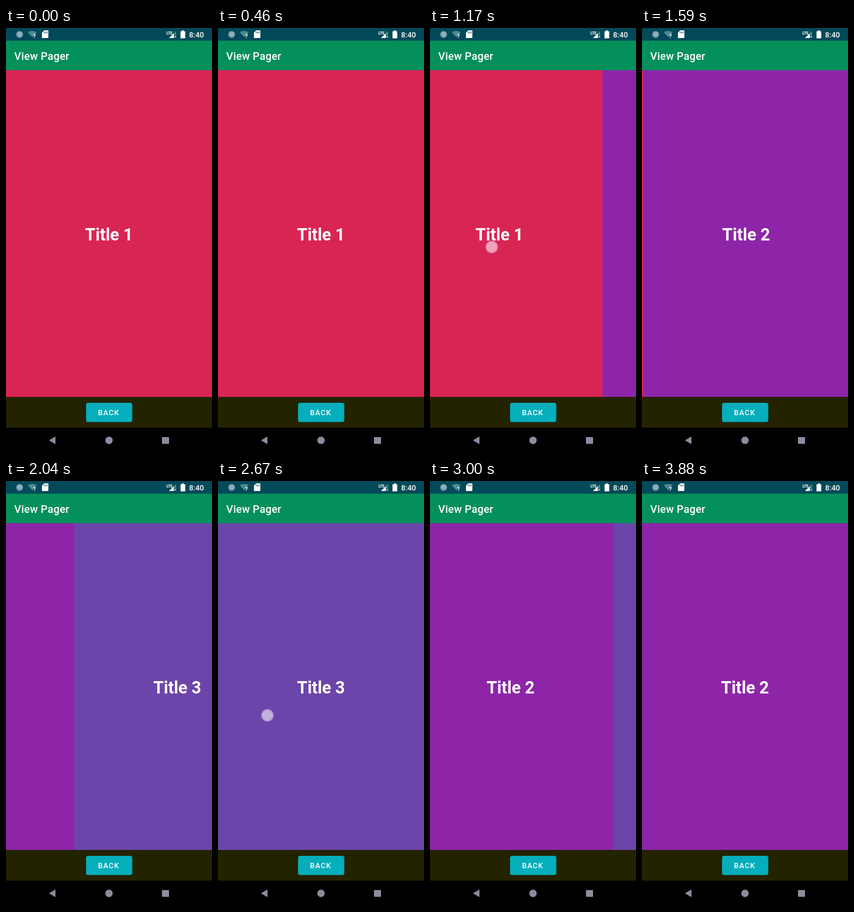
These frames come from a looping animation (350 by 720 pixels, 3920 ms). An HTML page:

```html
<!DOCTYPE html>
<html lang="en">
<head>
<meta charset="utf-8">
<title>View Pager</title>
<style>
html, body { margin: 0; width: 100%; height: 100%; overflow: hidden; background: #000; }
svg { display: block; width: 350px; height: 720px; }
text { font-family: Roboto, sans-serif; font-weight: 500; fill: #fff; }
#pages text { font-size: 28.6px; font-weight: 700; text-anchor: middle; }
</style>
</head>
<body>
<svg viewBox="0 0 350 720">
  <defs>
    <radialGradient id="glow">
      <stop offset=".7" stop-color="#fff" stop-opacity=".58"/>
      <stop offset=".82" stop-color="#e9c8ff" stop-opacity=".5"/>
      <stop offset="1" stop-color="#a040d0" stop-opacity="0"/>
    </radialGradient>
  </defs>

  <g id="pages"></g>
  <circle id="touch" r="12" fill="url(#glow)"/>

  <!-- status bar and toolbar -->
  <path d="M0 0H350V71.400H0z" fill="#04905b"/>
  <path d="M0 0H350V21.400H0z" fill="#024a59"/>
  <text x="14" y="53.5" font-size="18" letter-spacing=".25">View Pager</text>
  <circle cx="23" cy="11" r="6" fill="#5f8a9b"/>
  <circle cx="23.500" cy="10.500" r="4.500" fill="#8fb0bb"/>
  <path d="M37 7Q44.500 3 52 7L45 16z" fill="#4d8c92"/>
  <text x="46" y="16.500" font-size="9.500" style="font-weight:700">?</text>
  <path d="M65 4H71Q72 4 72 5V16Q72 17 71 17H62Q61 17 61 16V8z" fill="#fff"/>
  <path d="M65 6V9M67.500 6V9M70 6V9" stroke="#024a59"/>
  <text x="272.500" y="10.500" font-size="7" style="font-weight:700" letter-spacing="-.5">LTE</text>
  <path d="M289 5V17H277z" fill="#4d8c78"/>
  <path d="M285 9V17H277z" fill="#fff"/>
  <path d="M285 12H290V18H285z" fill="#024a59"/>
  <path d="M285.500 13L289 16.500M289 13L285.500 16.500" stroke="#fff"/>
  <path d="M299 4H302V5.500H304.500V17.500H296.500V5.500H299z" fill="#fff"/>
  <text x="311" y="15.700" font-size="12.800">8:40</text>

  <!-- bottom bar and navigation -->
  <path d="M0 625H350V677H0z" fill="#242300"/>
  <rect x="136" y="635" width="78.500" height="32.500" rx="3.500" fill="#05aebb"/>
  <text x="156.300" y="656" font-size="12.500" letter-spacing="1.1">BACK</text>
  <path d="M0 677H350V720H0z"/>
  <g fill="#8f8b9f">
    <path d="M73 698.500L84 692V705z"/>
    <circle cx="175" cy="698.500" r="6.300"/>
    <rect x="265" y="693" width="12" height="11.500" rx="1"/>
  </g>
</svg>
<script>
const LOOP = 3920, WIDTH = 350, SETTLE = 600;
const pages = document.getElementById('pages');
const touch = document.getElementById('touch');

// dir 1 goes to the next page; drag is the distance covered by the finger
const swipes = [
  { down: 950, start: 1008, release: 1222, dir: 1, drag: 75, x: 162, y: 371 },
  { down: 1800, start: 1850, release: 1944, dir: 1, drag: 70, x: 162, y: 380 },
  { down: 2640, start: 2740, release: 2803, dir: -1, drag: 70, x: 84, y: 397 }
];

pages.innerHTML = ['#d92554', '#8e25a9', '#6c45aa'].map((color, i) =>
  `<rect x="${i * WIDTH}" y="71" width="${WIDTH}" height="554" fill="${color}"/>
   <text x="${(i + .5) * WIDTH}" y="360">Title ${i + 1}</text>`).join('');

const clamp = v => Math.min(1, Math.max(0, v));

function draw(t) {
  let scroll = 0, finger = null;
  for (const s of swipes) {
    const dragged = s.drag * clamp((t - s.start) / (s.release - s.start));
    const settled = 1 - (1 - clamp((t - s.release) / SETTLE)) ** 5;
    scroll += s.dir * (dragged + (WIDTH - s.drag) * settled);
    if (t >= s.down && t < s.release) finger = [s.x - s.dir * dragged, s.y];
  }
  // whole pixels keep the seam between pages clean
  pages.setAttribute('transform', `translate(${-Math.round(scroll)})`);
  touch.style.display = finger ? '' : 'none';
  if (finger) touch.setAttribute('transform', `translate(${finger})`);
}

const origin = performance.now();
function frame() {
  draw((performance.now() - origin) % LOOP);
  requestAnimationFrame(frame);
}
frame();
</script>
</body>
</html>
```
